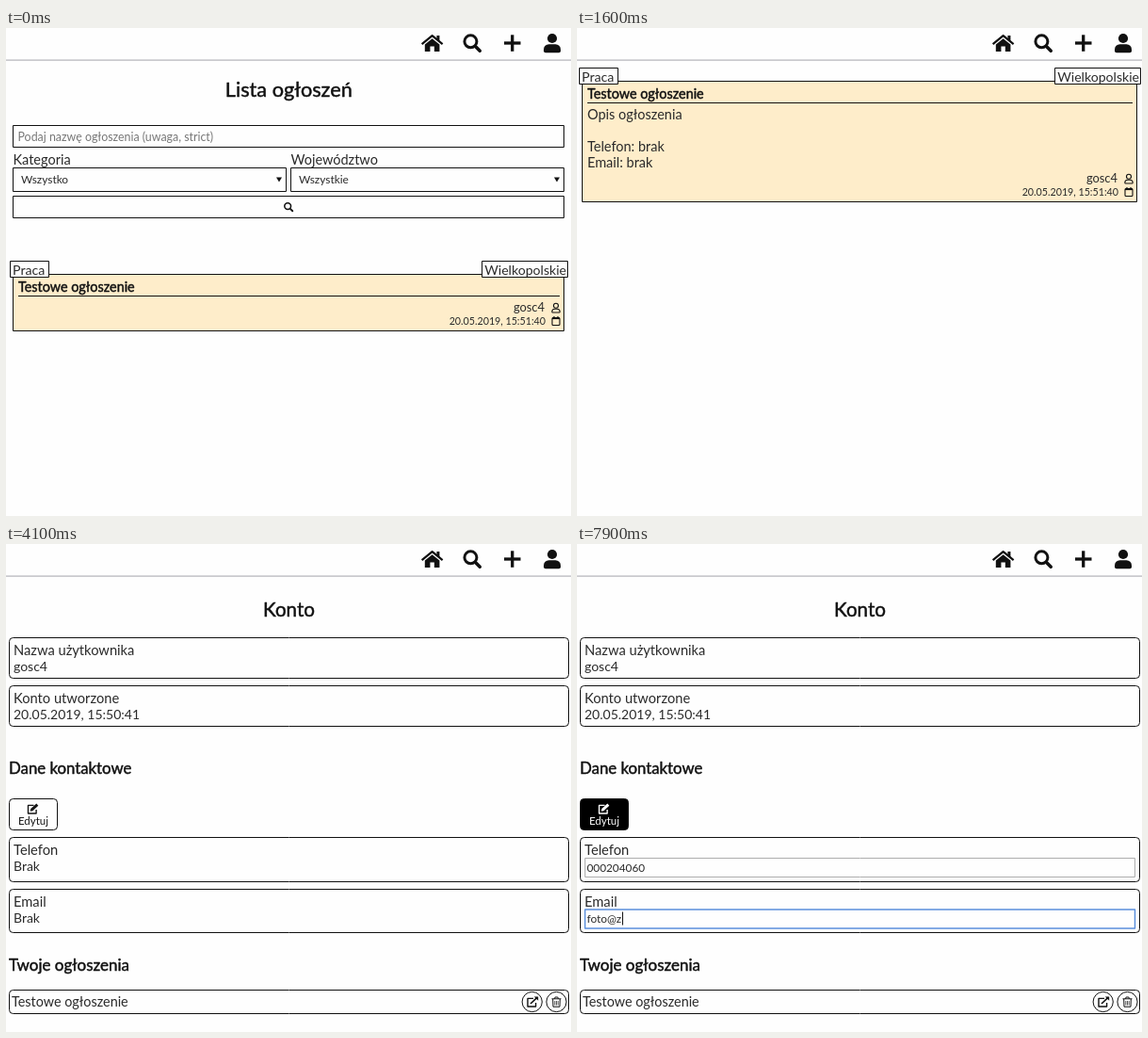
Write an HTML page with a canvas that moves like this. It is 600 by 518 pixels and loops after 8 s.

```html
<!DOCTYPE html>
<html lang="pl">
<head>
<meta charset="utf-8">
<title>Lista ogłoszeń</title>
<style>
  html, body { margin: 0; width: 100%; height: 100%; overflow: hidden; background: #fefefe; }
  canvas { display: block; width: 600px; height: 518px; }
</style>
</head>
<body>
<canvas id="stage"></canvas>
<script>
const W = 600, H = 518, LOOP = 8000;
const PAPER = '#fefefe', INK = '#111', SOFT = '#2a2a2a', CREAM = '#feedca';
const USER = 'gosc4', PHONE = '000204060', MAIL = 'foto@z';

const canvas = document.getElementById('stage');
const ctx = canvas.getContext('2d');
const dpr = window.devicePixelRatio || 1;
canvas.width = W * dpr;
canvas.height = H * dpr;

// Times at which text, caret and pages change
const phoneKeys = [5000, 5100, 5150, 5200, 5400, 5450, 5500, 5550, 5600];
const mailKeys = [7000, 7200, 7400, 7700, 7800, 7900];
const DETAIL_AT = 100, MENU_AT = 2000, ACCOUNT_AT = 2500;
const EDIT_AT = 4400, PHONE_AT = 4800, MAIL_AT = 6300, ENTER = 800;

const clamp = v => Math.max(0, Math.min(1, v));
const progress = (t, start, len) => clamp((t - start) / len);

// CSS "ease": cubic-bezier(.25, .1, .25, 1)
function ease(x) {
  let lo = 0, hi = 1;
  for (let i = 0; i < 24; i++) {
    const u = (lo + hi) / 2, v = 1 - u;
    if (0.75 * v * v * u + 0.75 * v * u * u + u * u * u < x) lo = u; else hi = u;
  }
  const v = 1 - lo;
  return 0.3 * v * v * lo + 3 * v * lo * lo + lo * lo * lo;
}

function text(str, x, y, size = 14.5, { color, align = 'left', bold = 0 } = {}) {
  ctx.font = `${size}px Lato, "Open Sans", sans-serif`;
  ctx.textAlign = align;
  ctx.fillStyle = ctx.strokeStyle = color || (bold ? INK : SOFT);
  ctx.fillText(str, x, y);
  if (bold) {
    ctx.lineWidth = bold;
    ctx.lineJoin = 'round';
    ctx.strokeText(str, x, y);
  }
}

// Outlined box given by its outer pixel edges
function box(x1, y1, x2, y2, { fill = PAPER, line = INK, r = 0, width = 1 } = {}) {
  ctx.beginPath();
  ctx.roundRect(x1 + .5, y1 + .5, x2 - x1 - 1, y2 - y1 - 1, r);
  ctx.fillStyle = fill;
  ctx.fill();
  ctx.strokeStyle = line;
  ctx.lineWidth = width;
  ctx.stroke();
}

function poly(points, { fill, line, width = 1 } = {}) {
  ctx.beginPath();
  for (let i = 0; i < points.length; i += 2) ctx.lineTo(points[i], points[i + 1]);
  if (fill) { ctx.fillStyle = fill; ctx.fill(); }
  if (line) {
    ctx.strokeStyle = line;
    ctx.lineWidth = width;
    ctx.lineJoin = 'round';
    ctx.stroke();
  }
}

function ring(x, y, r, width) {
  ctx.beginPath();
  ctx.arc(x, y, r, 0, 7);
  ctx.strokeStyle = INK;
  ctx.lineWidth = width;
  ctx.stroke();
}

function at(x, y, scale, draw) {
  ctx.save();
  ctx.translate(x, y);
  ctx.scale(scale, scale);
  draw();
  ctx.restore();
}

function searchIcon(x, y, scale) {
  at(x, y, scale, () => {
    ring(-1.6, -1.7, 6.5, 3);
    ctx.lineCap = 'round';
    poly([4, 4, 8.2, 8.2], { line: INK, width: 3.6 });
  });
}

function homeIcon(x, y) {
  at(x, y, 1, () => {
    poly([-11, 1.2, 0, -7.8, 11, 1.2], { line: INK, width: 2.2 });
    poly([4.8, -8, 7.8, -8, 7.8, -1, 4.8, -4], { fill: INK });
    poly([-7.8, 1.6, 0, -4.8, 7.8, 1.6, 7.8, 9, 2.2, 9, 2.2, 3.4, -2.2, 3.4, -2.2, 9, -7.8, 9], { fill: INK });
  });
}

function userIcon(x, y) {
  ctx.fillStyle = INK;
  ctx.beginPath();
  ctx.arc(x, y - 5, 5.1, 0, 7);
  ctx.fill();
  ctx.beginPath();
  ctx.roundRect(x - 9, y + 1.2, 18, 9, [5.5, 5.5, 2, 2]);
  ctx.fill();
}

function smallUser(x, y) {
  ring(x, y - 2.2, 2.5, 1.1);
  ctx.beginPath();
  ctx.roundRect(x - 4.2, y + 1.2, 8.4, 3.8, [3, 3, .8, .8]);
  ctx.stroke();
}

function calendar(x, y) {
  ctx.beginPath();
  ctx.roundRect(x - 4, y - 3.5, 8, 8, 1);
  ctx.strokeStyle = INK;
  ctx.lineWidth = 1.1;
  ctx.stroke();
  poly([x - 4, y - 2.7, x + 4, y - 2.7], { line: INK, width: 1.6 });
  for (const dx of [-2, 2]) poly([x + dx, y - 5, x + dx, y - 2.5], { line: INK, width: 1.2 });
}

function openSquare(x, y, color) {
  poly([x + 1, y - 3.6, x - 5, y - 3.6, x - 5, y + 5, x + 3.6, y + 5, x + 3.6, y + 1], { line: color, width: 1.4 });
}

function editIcon(x, y, color) {
  openSquare(x, y, color);
  poly([x - 1.2, y + 1.2, x + 4.8, y - 4.4], { line: color, width: 3 });
  poly([x - 2.8, y + 2.8, x - 2.2, y - .2, x + .2, y + 2.2], { fill: color });
}

function openIcon(x, y) {
  openSquare(x, y, INK);
  poly([x - 2, y + 2, x + 5, y - 4.6], { line: INK, width: 1.6 });
  poly([x + 1.8, y - 5.6, x + 6.2, y - 5.6, x + 6.2, y - 1.2], { fill: INK });
}

function trashIcon(x, y) {
  poly([x - 5, y - 3.2, x + 5, y - 3.2], { line: INK });
  poly([x - 2, y - 3.2, x - 1.4, y - 5, x + 1.4, y - 5, x + 2, y - 3.2], { line: INK });
  poly([x - 3.8, y - 3, x - 3.5, y + 5.2, x + 3.5, y + 5.2, x + 3.8, y - 3], { line: INK });
  for (const dx of [-1.7, 0, 1.7]) poly([x + dx, y - 1, x + dx, y + 3.5], { line: INK, width: .7 });
}

function header() {
  ctx.fillStyle = PAPER;
  ctx.fillRect(0, 0, W, 33);
  ctx.fillStyle = '#b4b4ba';
  ctx.fillRect(0, 33.5, W, 1.2);
  homeIcon(452.6, 16);
  searchIcon(495, 16, 1);
  poly([529, 16, 546.5, 16], { line: INK, width: 3.3 });
  poly([537.7, 7.3, 537.7, 24.8], { line: INK, width: 3.3 });
  userIcon(580, 16);
}

// Advert card: category and region tags on its corners, author at the bottom right
function card(left, right, top, bottom) {
  box(left, top, right, bottom, { fill: CREAM });
  box(left - 3, top - 14, left + 39, top + 4);
  text('Praca', left, top + .5, 14.2);
  box(right - 88, top - 14, right + 4, top + 4);
  text('Wielkopolskie', right + 2, top + .5, 14.1, { align: 'right' });
  text('Testowe ogłoszenie', left + 6, top + 19, 14.4, { bold: .45 });
  ctx.fillStyle = INK;
  ctx.fillRect(left + 6, top + 23, right - left - 11, 1);
  text(USER, right - 21, bottom - 21, 12.9, { align: 'right' });
  smallUser(right - 9, bottom - 25);
  text('20.05.2019, 15:51:40', right - 20, bottom - 7.5, 10.7, { align: 'right' });
  calendar(right - 9, bottom - 11);
}

function select(x, label, value) {
  text(label, x + .5, 145);
  box(x, 148, x + 291, 174);
  text(value, x + 9, 165, 11.9);
  poly([x + 280, 158.5, x + 286, 158.5, x + 283, 163.5], { fill: INK });
}

function listPage() {
  text('Lista ogłoszeń', 300.3, 73, 21.7, { align: 'center', bold: .45 });
  box(7, 103, 593, 127);
  text('Podaj nazwę ogłoszenia (uwaga, strict)', 12.5, 119.5, 12.4, { color: '#777' });
  select(7, 'Kategoria', 'Wszystko');
  select(302, 'Województwo', 'Wszystkie');
  box(7, 178, 593, 202);
  searchIcon(300, 190, .52);
  card(7, 593, 261, 322);
}

function detailPage() {
  card(5, 595, 56, 185);
  text('Opis ogłoszenia', 11, 97);
  text('Telefon: brak', 11, 131);
  text('Email: brak', 11, 148);
}

function field(top, bottom, label, value) {
  box(3, top, 598, bottom, { r: 4 });
  text(label, 8, top + 19, 14.7);
  if (value) text(value, 8, top + 36, 14);
}

function input(top, value, focused, caret) {
  box(8, top, 593, top + 21, { line: focused ? '#5b8fdc' : '#adadad', width: focused ? 1.5 : 1 });
  text(value, 10.5, top + 14.7, 11.8);
  if (focused && caret) {
    ctx.fillStyle = INK;
    ctx.fillRect(Math.round(11 + ctx.measureText(value).width), top + 3, 1, 14);
  }
}

const typed = (str, keys, t) => str.slice(0, keys.filter(k => k <= t).length);

function caretOn(t) {
  const last = Math.max(...[PHONE_AT, MAIL_AT, ...phoneKeys, ...mailKeys].filter(k => k <= t));
  return (t - last) % 1000 < 500;
}

function accountPage(t) {
  const editing = t >= EDIT_AT;
  text('Konto', 300.5, 77, 20.6, { align: 'center', bold: .45 });
  field(99, 143, 'Nazwa użytkownika', USER);
  field(150, 194, 'Konto utworzone', '20.05.2019, 15:50:41');
  text('Dane kontaktowe', 3, 244, 16.8, { bold: .45 });

  const dark = ease(progress(t, 4150, 300));
  const shade = v => `rgb(${v},${v},${v})`;
  const label = shade(Math.round(21 + 233 * dark));
  box(3, 270, 55, 304, { r: 4, fill: shade(Math.round(254 * (1 - dark))) });
  editIcon(28.5, 281, label);
  text('Edytuj', 29, 298, 11.5, { align: 'center', color: label });

  field(311, 359, 'Telefon', editing ? '' : 'Brak');
  field(366, 413, 'Email', editing ? '' : 'Brak');
  if (editing) {
    const caret = caretOn(t);
    input(333, typed(PHONE, phoneKeys, t), t >= PHONE_AT && t < MAIL_AT, caret);
    input(387.5, typed(MAIL, mailKeys, t), t >= MAIL_AT, caret);
  }

  text('Twoje ogłoszenia', 3, 453, 17, { bold: .45 });
  box(3, 473, 598, 499, { r: 4 });
  text('Testowe ogłoszenie', 6, 491, 14.4);
  ring(558.7, 486, 10.6, 1);
  openIcon(559, 486);
  ring(584.5, 486, 10.6, 1);
  trashIcon(584.5, 486);
}

// Slides a page down into place, in whole pixels, while it fades in
function enter(t, start, rise, draw) {
  const e = ease(progress(t, start, ENTER));
  ctx.save();
  ctx.translate(0, -Math.round(rise * (1 - e)));
  draw(t);
  ctx.restore();
  ctx.globalAlpha = 1 - e;
  ctx.fillStyle = PAPER;
  ctx.fillRect(0, 0, W, H);
  ctx.globalAlpha = 1;
}

function menu(t) {
  ctx.globalAlpha = ease(progress(t, MENU_AT, 200));
  ctx.fillStyle = '#222023';
  ctx.fillRect(485, 33, 115, 68);
  text('Konto', 495, 54, 13.7, { color: '#e6e6e6', bold: .5 });
  text('Wyloguj', 495, 91, 13.8, { color: '#e6e6e6', bold: .5 });
  ctx.globalAlpha = 1;
}

function render(t) {
  ctx.setTransform(dpr, 0, 0, dpr, 0, 0);
  ctx.fillStyle = PAPER;
  ctx.fillRect(0, 0, W, H);
  if (t < DETAIL_AT) listPage();
  else if (t < ACCOUNT_AT) enter(t, DETAIL_AT, 12, detailPage);
  else enter(t, ACCOUNT_AT, 27, accountPage);
  header();
  if (t >= MENU_AT && t < ACCOUNT_AT) menu(t);
}

const begin = performance.now();
function tick() {
  render((performance.now() - begin) % LOOP);
  requestAnimationFrame(tick);
}
tick();
</script>
</body>
</html>
```
